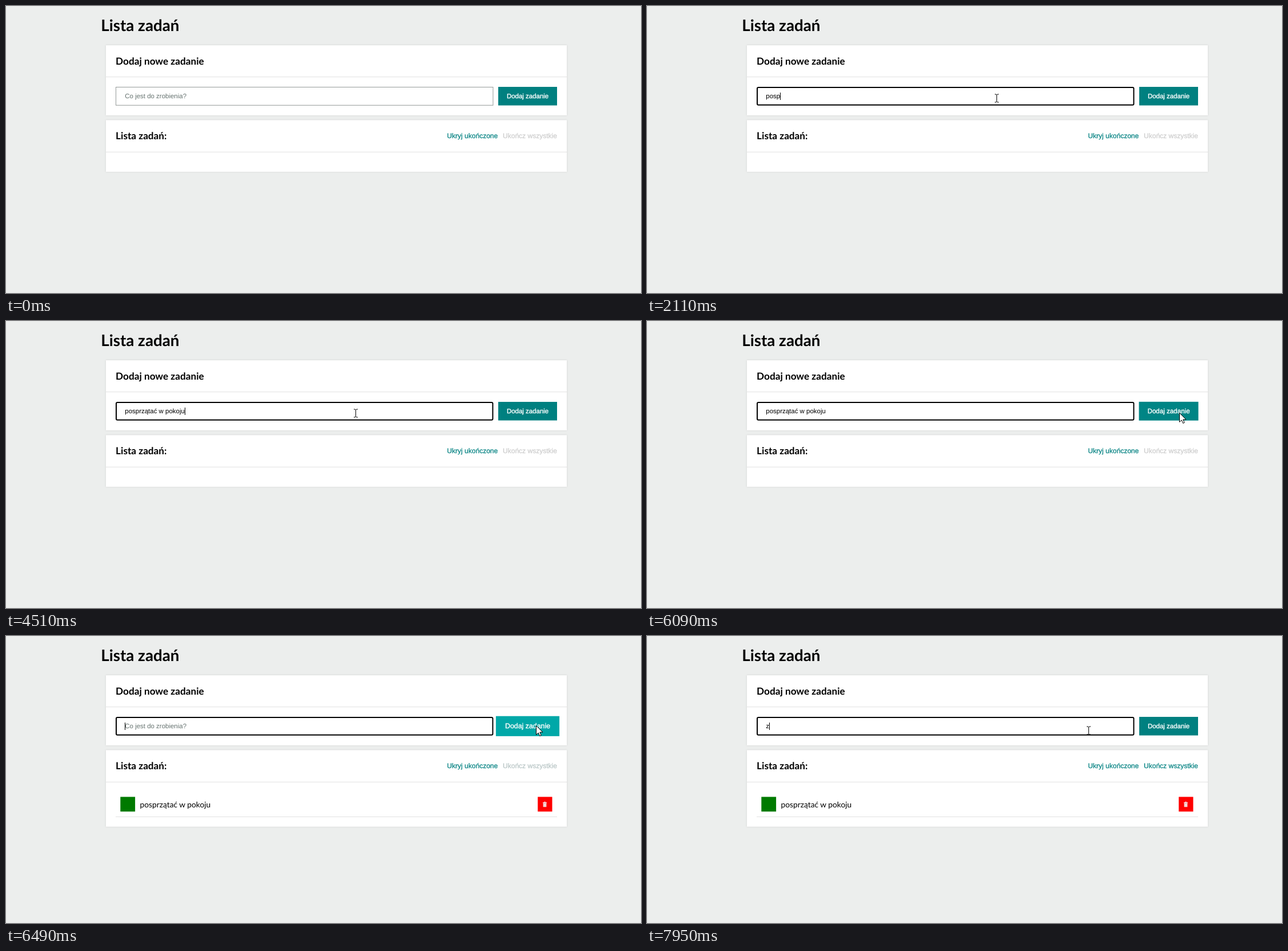
An HTML page for the animation above (8 s loop, 1112 by 504 pixels).

```html
<!DOCTYPE html>
<html lang="pl">
<head>
<meta charset="utf-8">
<title>Lista zadań</title>
<style>
  html, body { margin: 0; width: 100%; height: 100%; overflow: hidden; background: #eceeed; }
  svg { display: block; width: 1112px; height: 504px; }
  text { white-space: pre; text-rendering: geometricPrecision; font: 11.47px "Liberation Sans", Arial, sans-serif; }
  .head { font: 700 17.2px Lato, sans-serif; }
  .title { font: 700 27.8px Lato, sans-serif; }
  .task { font: 13.76px Lato, sans-serif; }
  .link { font-size: 12.04px; fill: #008080; stroke: #008080; stroke-width: .25; }
  .label { fill: #fff; stroke: #fff; stroke-width: .35; }
  .panel { fill: #fff; filter: drop-shadow(0 0 1.7px #d0d0d0); }
  .line { fill: #e2e2e2; }
</style>
</head>
<body>
<svg viewBox="0 0 1112 504">
  <text class="title" x="166.2" y="43.6">Lista zadań</text>

  <rect class="panel" x="175" y="69" width="807" height="123"/>
  <rect class="line" x="175" y="124" width="807" height="1"/>
  <text class="head" x="192.1" y="102.8">Dodaj nowe zadanie</text>
  <rect id="field" fill="#fff"/>
  <text id="entry" x="208.3" y="162"></text>
  <rect id="caret" y="152" width="1" height="13"/>
  <g id="button">
    <rect id="face" x="862" y="142" width="103" height="32.6"/>
    <text class="label" x="876.9" y="162">Dodaj zadanie</text>
  </g>

  <rect class="panel" id="list" x="175" y="200.4" width="807"/>
  <rect class="line" x="175" y="256" width="807" height="1"/>
  <text class="head" x="192.1" y="234.4">Lista zadań:</text>
  <text class="link" x="772.3" y="232">Ukryj ukończone</text>
  <text class="link" id="finish" x="870" y="232">Ukończ wszystkie</text>

  <g id="task">
    <rect x="200.3" y="282.5" width="25.8" height="25.8" fill="#007a00"/>
    <text class="task" x="234.6" y="300.6">posprzątać w pokoju</text>
    <rect x="931.2" y="282.5" width="25.3" height="25.8" fill="red"/>
    <path d="M940 292h7v1.4h-7zM942 291h3v1h-3zM940.6 293.8h5.8v6.4h-5.8z" fill="#f3d5d5"/>
    <rect class="line" x="192" y="317" width="773" height="1"/>
  </g>

  <path id="arrow" d="M.5.5V16.5L4.2 13 6.7 18.6 9.2 17.5 6.8 12H12z" fill="#fff" stroke="#000" stroke-linejoin="round"/>
  <path id="beam" d="M-3-7H-1L.5-6 2-7H4M.5-6V6M-3 7H-1L.5 6 2 7H4" fill="none" stroke="#000"/>
</svg>
<script>
const LOOP = 8000, BLINK = 525, FADE = 500;
const FOCUS = 860, TYPE = 1720, TYPED = 4510, HOVER = 6030, SUBMIT = 6440, LEAVE = 6970, RETYPE = 7950;
const phrase = "posprzątać w pokoju";

// pointer stops: time, x, y
const stops = [
  [250, 690, 500], [FOCUS, 612, 162], [5500, 612, 162], [5720, 890, 116], [5900, 980, 162],
  [6090, 932, 161], [6490, 928, 157], [6940, 928, 157], [7020, 774, 170], [7400, 773, 166]
];

const $ = id => document.getElementById(id);
const set = (id, attrs) => {
  for (const k in attrs) $(id).setAttribute(k, attrs[k]);
};
const show = (id, on) => set(id, { visibility: on ? "visible" : "hidden" });
const mix = (a, b, p) => a + (b - a) * p;
const clamp = p => Math.min(1, Math.max(0, p));
const smooth = p => p * p * (3 - 2 * p);

// the CSS "ease" curve, with its parameter found by bisection
function ease(x) {
  const curve = (s, a, b) => 3 * (1 - s) ** 2 * s * a + 3 * (1 - s) * s * s * b + s ** 3;
  let lo = 0, hi = 1;
  for (let i = 0; i < 20; i++) {
    const mid = (lo + hi) / 2;
    if (curve(mid, .25, .25) < x) lo = mid; else hi = mid;
  }
  return curve(lo, .1, 1);
}
const fade = (t, from) => ease(clamp((t - from) / FADE));

function typedText(t) {
  if (t >= RETYPE) return "z";
  if (t < TYPE || t >= SUBMIT) return "";
  const p = clamp((t - TYPE) / (TYPED - TYPE));
  return phrase.slice(0, Math.round(mix(1, phrase.length, p)));
}

function caretOn(t) {
  if (t >= TYPE && t < TYPED) return true;
  const since = [RETYPE, SUBMIT, TYPED, FOCUS].find(s => t >= s);
  return Math.floor((t - since) / BLINK) % 2 === 0;
}

function drawField(t) {
  const focused = t >= FOCUS, w = focused ? 2 : 1;
  set("field", {
    x: 192 + w / 2, y: 142 + w / 2, width: 661.4 - w, height: 32.8 - w,
    rx: focused ? 2 : 0, stroke: focused ? "#000" : "#949a98", "stroke-width": w
  });

  const typed = typedText(t), entry = $("entry");
  entry.textContent = typed || "Co jest do zrobienia?";
  entry.setAttribute("fill", typed ? "#000" : "#667370");
  const end = typed ? entry.getComputedTextLength() : 0;
  set("caret", { x: Math.round(208 + end) });
  show("caret", focused && caretOn(t));
}

function drawButton(t) {
  const p = fade(t, HOVER) - fade(t, LEAVE);
  const c = Math.round(mix(128, 168, p));
  set("button", { transform: `translate(913.5 158.3) scale(${1 + .08 * p}) translate(-913.5 -158.3)` });
  set("face", { fill: `rgb(0,${c},${c})` });
}

function drawList(t) {
  const added = t >= SUBMIT, p = fade(t, SUBMIT);
  set("list", { height: added ? 134.4 : 90.8 });
  show("task", added);
  const c = Math.round(mix(204, 128, p));
  const color = `rgb(${Math.round(mix(204, 0, p))},${c},${c})`;
  Object.assign($("finish").style, { fill: color, stroke: color });
}

function pointer(t) {
  const i = Math.max(1, stops.findIndex(s => s[0] > t));
  const [a, b] = t < stops[stops.length - 1][0] ? [stops[i - 1], stops[i]] : stops.slice(-2);
  const p = smooth(clamp((t - a[0]) / (b[0] - a[0])));
  return [1, 2].map(k => Math.round(mix(a[k], b[k], p)));
}

function drawPointer(t) {
  const [x, y] = pointer(t), visible = t >= stops[0][0];
  const inField = x > 192 && x < 853 && y > 142 && y < 175;
  const transform = `translate(${x} ${y})`;
  set("arrow", { transform });
  set("beam", { transform });
  show("arrow", visible && !inField);
  show("beam", visible && inField);
}

const start = performance.now();
function draw(now) {
  const t = Math.max(0, now - start) % LOOP;
  drawField(t);
  drawButton(t);
  drawList(t);
  drawPointer(t);
  requestAnimationFrame(draw);
}
draw(start);
</script>
</body>
</html>
```
